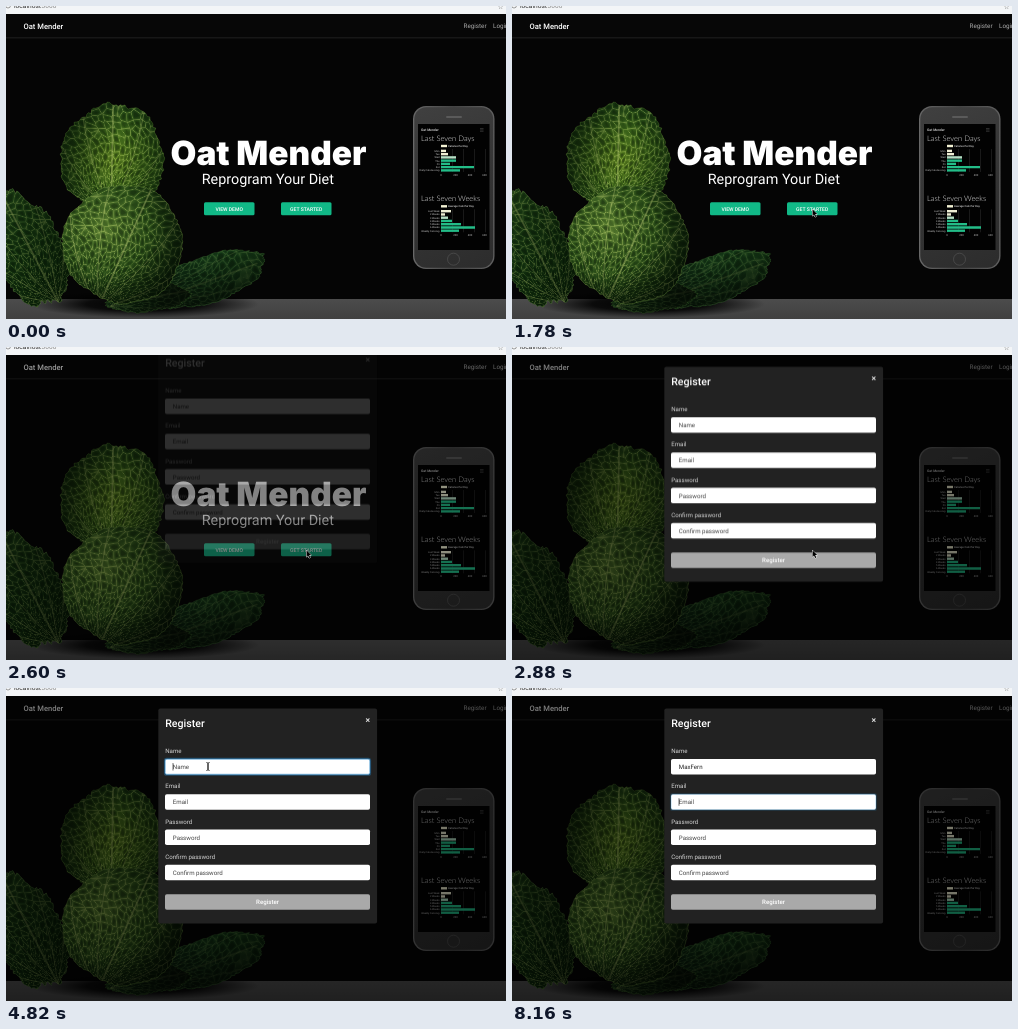
Write an HTML page with a canvas that moves like this. It is 500 px wide and 313 px high and loops after 8.18 s.

```html
<!DOCTYPE html>
<html lang="en">
<head>
<meta charset="utf-8">
<title>Register demo</title>
<style>
html, body { margin: 0; width: 100%; height: 100%; overflow: hidden; background: #000; }
canvas { display: block; width: 500px; height: 313px; }
</style>
</head>
<body>
<canvas id="stage"></canvas>
<script>
const W = 500, H = 313, LOOP = 8180;
const BRAND = 'Oat Mender', USER = 'MaxFern';
const SANS = 'Roboto, sans-serif';
const scale = Math.max(1, window.devicePixelRatio || 1);

function setup(canvas) {
  canvas.width = W * scale;
  canvas.height = H * scale;
  const c = canvas.getContext('2d');
  c.scale(scale, scale);
  c.textRendering = 'geometricPrecision';
  return c;
}
const layer = () => setup(document.createElement('canvas'));
const clamp = v => Math.min(1, Math.max(0, v));
const progress = (t, from, to) => clamp((t - from) / (to - from));
const mix = (a, b, k) => a + (b - a) * k;
const smooth = k => k * k * (3 - 2 * k);
const hash = (x, y) => {
  const s = Math.sin(x * 127.1 + y * 311.7) * 43758.5453;
  return s - Math.floor(s);
};

function text(c, str, x, y, size, color, { weight = 400, align = 'left', font = SANS } = {}) {
  c.font = `${weight} ${size}px ${font}`;
  c.textAlign = align;
  c.fillStyle = color;
  c.fillText(str, x, y);
}
function box(c, x, y, w, h, r, fill) {
  c.beginPath();
  c.roundRect(x, y, w, h, r);
  c.fillStyle = fill;
  c.fill();
}
function ramp(gradient, colors) {
  colors.forEach((color, i) => gradient.addColorStop(i / (colors.length - 1), color));
  return gradient;
}
const linear = (c, x0, y0, x1, y1, ...colors) => ramp(c.createLinearGradient(x0, y0, x1, y1), colors);
const radial = (c, x, y, r, ...colors) => ramp(c.createRadialGradient(x, y, 0, x, y, r), colors);

// Net of pale veins spreading from the leaf's base: cells laid out by angle and distance.
function veinNet({ x, y }, strength) {
  const canvas = document.createElement('canvas');
  const w = canvas.width = Math.round(280 * scale), h = canvas.height = Math.round(H * scale);
  const c = canvas.getContext('2d'), img = c.createImageData(w, h);
  for (let py = Math.floor(80 * scale); py < h; py++) for (let px = 0; px < w; px++) {
    const dx = px / scale - x, dy = py / scale - y, r = Math.hypot(dx, dy);
    const u = Math.atan2(dx, -dy) * 14 + Math.sin(r / 13), v = r / 7.5;
    let near = 9, next = 9;
    for (let j = -1; j < 2; j++) for (let i = -1; i < 2; i++) {
      const cx = Math.floor(u) + i, cy = Math.floor(v) + j;
      const d = Math.hypot(cx + hash(cx, cy) - u, cy + hash(cy + 9, cx) - v);
      if (d < near) { next = near; near = d; } else if (d < next) next = d;
    }
    const edge = next - near, vein = clamp(1 - edge / 0.22);
    img.data.set([mix(4, 178, vein), mix(18, 198, vein), mix(3, 105, vein),
      255 * mix(0.5 * clamp(edge * 1.6), strength, vein)], (py * w + px) * 4);
  }
  c.putImageData(img, 0, 0);
  return canvas;
}

// Tilted oval with a wavy, ragged rim.
function leafPath({ x, y, rx, ry, tilt, frill }) {
  const path = new Path2D(), steps = 150;
  for (let i = 0; i < steps; i++) {
    const a = i / steps * 2 * Math.PI;
    const k = 1 + frill * (Math.sin(a * 7 + x) * 0.5 + Math.sin(a * 3 + y) * 0.6 + hash(i, x) - 0.5);
    const ex = Math.cos(a) * rx * k, ey = Math.sin(a) * ry * k;
    path.lineTo(x + ex * Math.cos(tilt) - ey * Math.sin(tilt), y + ex * Math.sin(tilt) + ey * Math.cos(tilt));
  }
  path.closePath();
  return path;
}

function drawLeaf(c, { shape, base, heading, spread, reach, fill, shade, rim, strength }) {
  const path = leafPath(shape);
  c.save();
  c.clip(path);
  c.fillStyle = fill;
  c.fillRect(0, 80, 280, 233);
  c.drawImage(veinNet(base, strength), 0, 0, 280, H);
  c.lineCap = 'round';
  c.strokeStyle = `rgba(178,198,112,${strength})`;
  for (let i = -3; i <= 3; i++) {
    const bent = heading + spread * i / 2, end = heading + spread * i / 3;
    c.lineWidth = i ? 0.9 : 1.7;
    c.beginPath();
    c.moveTo(base.x, base.y);
    c.quadraticCurveTo(base.x + Math.cos(bent) * reach / 2, base.y + Math.sin(bent) * reach / 2,
      base.x + Math.cos(end) * reach, base.y + Math.sin(end) * reach);
    c.stroke();
  }
  c.fillStyle = shade;
  c.fillRect(0, 80, 280, 233);
  c.restore();
  c.strokeStyle = rim;
  c.lineWidth = 0.7;
  c.stroke(path);
}

function drawCabbage(c) {
  c.save();
  c.translate(138, 298);
  c.scale(1, 0.12);
  c.fillStyle = radial(c, 0, 0, 115, '#000', 'rgba(0,0,0,.85)', 'rgba(0,0,0,0)');
  c.fillRect(-120, -120, 240, 240);
  c.restore();

  drawLeaf(c, {
    shape: { x: 107, y: 155, rx: 51, ry: 57, tilt: -0.15, frill: 0.06 },
    base: { x: 105, y: 205 }, heading: -1.55, spread: 0.9, reach: 108, strength: 0.45,
    fill: radial(c, 108, 155, 62, '#6b9425', '#47751f', '#1d4417'),
    shade: linear(c, 55, 140, 165, 160, 'rgba(0,8,0,.5)', 'rgba(0,8,0,0)', 'rgba(0,8,0,.35)'),
    rim: 'rgba(80,120,45,.5)'
  });
  drawLeaf(c, {
    shape: { x: 24, y: 245, rx: 34, ry: 58, tilt: -0.38, frill: 0.09 },
    base: { x: 52, y: 296 }, heading: -2.05, spread: 0.7, reach: 115, strength: 0.42,
    fill: linear(c, 0, 190, 55, 295, '#2c5c20', '#1d4817', '#12330f'),
    shade: linear(c, 0, 240, 65, 230, 'rgba(0,6,0,.2)', 'rgba(0,6,0,.55)'),
    rim: 'rgba(85,122,60,.55)'
  });
  drawLeaf(c, {
    shape: { x: 198, y: 274, rx: 64, ry: 23, tilt: -0.3, frill: 0.07 },
    base: { x: 140, y: 298 }, heading: -0.35, spread: 0.5, reach: 118, strength: 0.2,
    fill: linear(c, 145, 260, 250, 270, '#14341a', '#1d4a20', '#1a431b'),
    shade: linear(c, 190, 248, 200, 300, 'rgba(0,0,0,.05)', 'rgba(0,0,0,.7)'),
    rim: 'rgba(62,104,50,.5)'
  });
  drawLeaf(c, {
    shape: { x: 140, y: 290, rx: 42, ry: 16, tilt: -0.05, frill: 0.08 },
    base: { x: 105, y: 300 }, heading: -0.2, spread: 0.6, reach: 85, strength: 0.2,
    fill: '#1b411a', shade: linear(c, 100, 280, 160, 306, 'rgba(0,0,0,.25)', 'rgba(0,0,0,.7)'),
    rim: 'rgba(62,100,46,.4)'
  });
  drawLeaf(c, {
    shape: { x: 117, y: 238, rx: 60, ry: 59, tilt: 0.25, frill: 0.03 },
    base: { x: 92, y: 302 }, heading: -1.15, spread: 0.95, reach: 132, strength: 0.52,
    fill: radial(c, 98, 222, 88, '#648d35', '#3f6e24', '#163a13'),
    shade: radial(c, 95, 220, 95, 'rgba(0,0,0,0)', 'rgba(0,5,0,.15)', 'rgba(0,4,0,.75)'),
    rim: 'rgba(110,145,65,.5)'
  });
}

function drawChart(c, top, title, legend, rows, lengths) {
  text(c, title, 415, top, 7.6, '#e4e4e4', { font: 'Lato, sans-serif', weight: 300 });
  box(c, 435, top + 3.8, 6, 2.4, 0, '#f3f2d4');
  text(c, legend, 442, top + 6.1, 2.7, '#ddd', { weight: 500 });
  c.fillStyle = '#303030';
  for (let x = 435; x < 482; x += 11) c.fillRect(x, top + 8, 0.5, 23);
  lengths.forEach((length, i) => {
    const y = top + 8.7 + i * 3.25;
    text(c, rows[i], 433.5, y + 2.2, 2.5, '#ccc', { align: 'right' });
    box(c, 435, y, length, 2.4, 0, i < 2 ? '#eeeed4' : i === 2 ? '#b6dfc5' : '#23bd88');
  });
  for (let i = 0; i < 4; i++) text(c, i * 200, 435 + i * 14.5, top + 34.5, 2.7, '#bbb', { align: 'center' });
}

function drawPhone(c) {
  box(c, 407, 100, 81.5, 163, 13, linear(c, 407, 0, 488, 0, '#686868', '#444', '#606060'));
  box(c, 408.3, 101.3, 78.9, 160.4, 12, linear(c, 408, 100, 488, 262, '#404040', '#353535', '#2c2c2c'));
  box(c, 440, 110, 16, 2, 1, '#5a5a5a');
  box(c, 412, 118, 71.5, 126, 0, '#020202');
  c.beginPath();
  c.arc(447.5, 253.2, 6, 0, 7);
  c.strokeStyle = '#525252';
  c.lineWidth = 0.7;
  c.stroke();
  text(c, BRAND, 415, 125, 3.4, '#ddd', { weight: 500 });
  for (let i = 0; i < 3; i++) box(c, 474, 122.5 + i * 1.2, 3.5, 0.5, 0, '#555');
  drawChart(c, 135, 'Last Seven Days', 'Calories Per Day',
    ['Mon', 'Tue', 'Wed', 'Thu', 'Fri', 'Sat', 'Daily Calories Avg'], [5, 7, 15, 15, 9, 33, 19]);
  const weeks = Array.from({ length: 5 }, (_, i) => `${i + 2} Weeks`);
  drawChart(c, 195.3, 'Last Seven Weeks', 'Average Cals Per Day',
    ['Last Week', ...weeks, 'Weekly Cals Avg'], [10, 4, 7, 11, 20, 34, 18]);
}

function drawButton(c, x, label) {
  box(c, x, 196.2, 50.5, 13, 1.5, '#11b987');
  text(c, label, x + 25.2, 204.6, 5.1, '#fff', { weight: 500, align: 'center' });
}

function buildPage() {
  const c = layer();
  box(c, 0, 0, W, H, 0, '#050505');
  box(c, 0, 293, W, 20, 0, linear(c, 0, 293, 0, 313, '#4c4c4c', '#404040'));
  drawCabbage(c);
  drawPhone(c);
  box(c, 0, 0, W, 8, 0, '#f3f5f7');
  text(c, 'localhost', 8, 2, 6.6, '#333');
  text(c, ':3000', 34, 2, 6.6, '#888');
  c.strokeStyle = '#777';
  c.lineWidth = 0.7;
  c.beginPath();
  c.arc(2, -0.5, 2.5, 0, 7);
  c.stroke();
  text(c, '☆', 491.5, 3, 7, '#666', { font: 'DejaVu Sans, sans-serif' });
  box(c, 0, 8, W, 24, 0, '#070707');
  box(c, 0, 31.5, W, 0.8, 0, '#282828');
  text(c, BRAND, 17.5, 22.9, 7.6, '#fff', { weight: 500 });
  text(c, 'Register', 457.5, 22.2, 6.3, '#aaa');
  text(c, 'Login', 487, 22.2, 6.3, '#aaa');
  text(c, BRAND, 262.5, 158.5, 33.4, '#fff', { weight: 900, align: 'center', font: 'Inter, sans-serif' });
  text(c, 'Reprogram Your Diet', 261.8, 178, 14.4, '#fff', { align: 'center' });
  drawButton(c, 198, 'VIEW DEMO');
  drawButton(c, 275, 'GET STARTED');
  return c.canvas;
}

const NAME_FOCUS = 4480, EMAIL_FOCUS = 8040;
const FIRST_BURST = 5540, SECOND_BURST = 7100, KEY_GAP = 240;
const keyTime = i => i < 4 ? FIRST_BURST + i * KEY_GAP : SECOND_BURST + (i - 4) * KEY_GAP;

function caretOn(t) {
  const blinkedOff = (t >= 5120 && t < FIRST_BURST) || (t >= 6940 && t < SECOND_BURST);
  return t >= NAME_FOCUS + 60 && !blinkedOff;
}

function drawField(c, label, value, y, glow, caret) {
  text(c, label, 159.2, y - 6, 6.13, '#d4d4d4');
  if (glow) box(c, 157.9, y - 1.3, 207.2, 18.1, 2.6, `rgba(35,135,205,${0.4 * glow})`);
  box(c, 159, y, 205, 15.5, 1.8, '#fff');
  if (glow) {
    c.beginPath();
    c.roundRect(159.2, y + 0.2, 204.6, 15.1, 1.7);
    c.strokeStyle = `rgba(65,148,205,${glow})`;
    c.lineWidth = 0.7;
    c.stroke();
  }
  text(c, value || label, 166.8, y + 10, 6.13, value ? '#222' : '#444');
  if (caret) box(c, 166.7 + (value ? c.measureText(value).width : 0), y + 3.9, 0.6, 7.6, 0, '#111');
}

function drawModal(c, t) {
  const typed = [...USER].filter((_, i) => t >= keyTime(i)).join('');
  const toEmail = progress(t, EMAIL_FOCUS, EMAIL_FOCUS + 300);
  const nameGlow = progress(t, NAME_FOCUS, NAME_FOCUS + 160) * (1 - progress(t, EMAIL_FOCUS, EMAIL_FOCUS + 120));
  const onEmail = t >= EMAIL_FOCUS;
  box(c, 152.3, 20.5, 218.8, 215, 2, '#222');
  text(c, 'Register', 159.2, 39.4, 10.6, '#fff', { weight: 500 });
  text(c, '×', 361.7, 35, 8.6, '#ddd', { weight: 700, align: 'center' });
  ['Name', 'Email', 'Password', 'Confirm password'].forEach((label, i) => drawField(c, label,
    i === 0 ? typed : '', 71 + i * 35.25,
    i === 0 ? nameGlow : i === 1 ? toEmail : 0,
    i === 0 ? !onEmail && caretOn(t) : i === 1 && onEmail));
  box(c, 159, 206.2, 205, 15.5, 1.8, '#a9a9a9');
  text(c, 'Register', 261.5, 216.1, 6.13, '#fff', { weight: 500, align: 'center' });
}

function drawArrow(c, x, y) {
  const arrow = new Path2D('M0 0V6.6L1.5 5.2 2.6 7.7 3.7 7.2 2.7 4.8H4.7Z');
  c.save();
  c.translate(x, y);
  c.lineJoin = 'round';
  c.strokeStyle = '#fff';
  c.lineWidth = 1;
  c.stroke(arrow);
  c.fillStyle = '#000';
  c.fill(arrow);
  c.restore();
}

function drawBeam(c, x, y) {
  c.strokeStyle = '#111';
  c.lineWidth = 0.8;
  c.beginPath();
  for (const side of [-1, 1]) {
    c.moveTo(x + side * 1.6, y - 4);
    c.quadraticCurveTo(x, y - 4, x, y - 2.8);
    c.lineTo(x, y + 2.8);
    c.quadraticCurveTo(x, y + 4, x + side * 1.6, y + 4);
  }
  c.stroke();
}

function drawPointer(c, t) {
  if (t < 60 || t >= FIRST_BURST) return;
  const enter = smooth(progress(t, 60, 800)), leave = smooth(progress(t, 3320, 4320));
  const x = mix(mix(350, 300.5, enter), 202, leave);
  const y = mix(mix(318, 203.3, enter), 78.5, leave);
  if (leave > 0.94) drawBeam(c, x, y); else drawArrow(c, x, y);
}

const screen = setup(document.getElementById('stage'));
const modal = layer();
const page = buildPage();

function render(t) {
  screen.drawImage(page, 0, 0, W, H);
  const dim = 0.5 * progress(t, 2480, 2630);
  if (dim) {
    screen.save();
    screen.beginPath();
    screen.rect(0, 8, W, H - 8);
    screen.clip();
    box(screen, 0, 8, W, H - 8, 0, `rgba(0,0,0,${dim})`);
    modal.clearRect(0, 0, W, H);
    drawModal(modal, t);
    const drop = Math.pow(1 - progress(t, 2575, 2925), 1.6);
    screen.globalAlpha = progress(t, 2575, 2725);
    screen.drawImage(modal.canvas, 0, -22 * drop, W, H);
    screen.restore();
  }
  drawPointer(screen, t);
}

const start = performance.now();
function tick() {
  render((performance.now() - start) % LOOP);
  requestAnimationFrame(tick);
}
tick();
</script>
</body>
</html>
```
